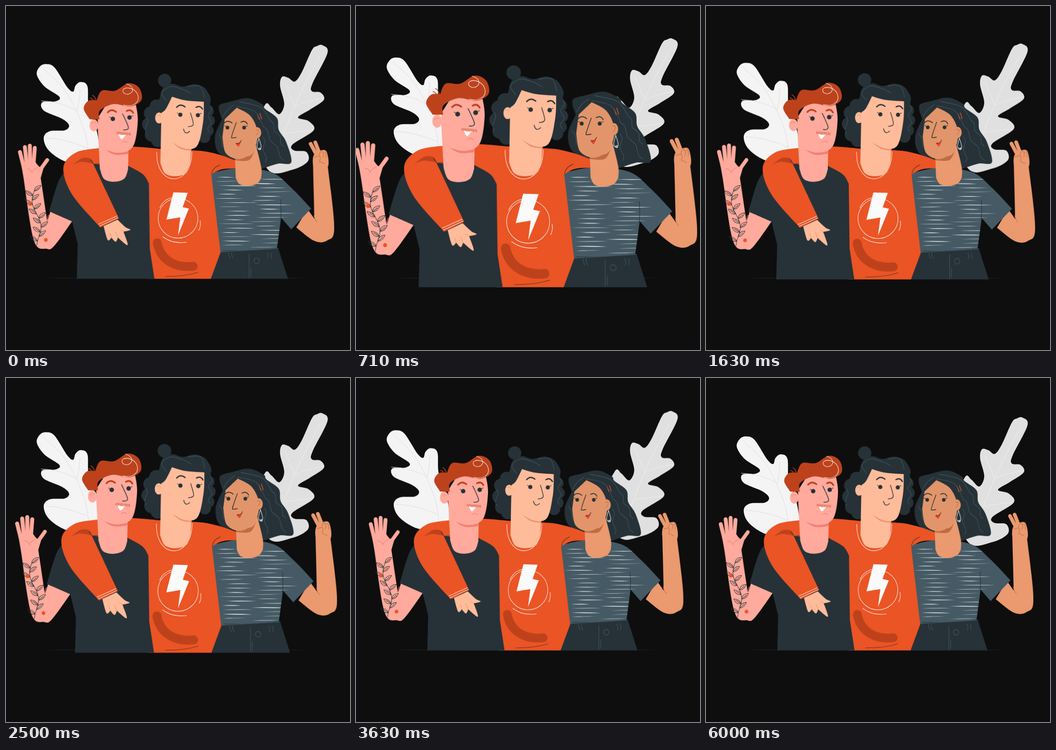
Recreate the animation shown at these times as an HTML page. Size 748 by 748 pixels, loop 6.04 s.

```html
<!DOCTYPE html>
<html lang="en">
<head>
<meta charset="utf-8">
<title>Three friends</title>
<style>
html, body { margin: 0; width: 100%; height: 100%; overflow: hidden; background: #0e0e0e; }
svg { display: block; width: 100%; height: 100%; }
path { stroke-linecap: round; stroke-linejoin: round; }
#leaves { animation: float 6040ms linear infinite; }
#people { transform-origin: 370px 370.5px; animation: beat 6040ms linear infinite; }
@keyframes float {
  0% { transform: translateY(-.8px); }
  24.21%, 49.04%, 73.87%, 98.71%, 100% { transform: translateY(0); }
  11.79%, 36.62%, 61.46%, 86.29% { transform: translateY(-15px); }
}
@keyframes beat {
  0% { transform: scale(1.005); }
  9.3%, 49.04% { transform: scale(1.1); }
  29.17%, 39.11%, 58.97%, 100% { transform: scale(1); }
}
</style>
</head>
<body>
<svg id="stage" viewBox="0 0 748 748"></svg>
<script>
const DARK = '#263238', SLATE = '#455a64', ORANGE = '#eb5424', RUST = '#bd421c', WHITE = '#fafafa';
const ROSE = '#ffaa9c', BLUSH = '#f17f73', PEACH = '#ffbc9b', AMBER = '#ef936c';
const TAN = '#eb996e', BROWN = '#e2956a', UMBER = '#c06c42';

const times = (n, make) => Array.from({ length: n }, (_, i) => make(i)).join('');
const random = (seed => () => (seed = seed * 16807 % 2147483647) / 2147483647)(71);

// Smooth curve through key points; "/" makes the point before it a corner.
function curve(pts, loop) {
  const n = pts.length;
  const at = i => loop ? pts[(i + n) % n] : pts[Math.max(0, Math.min(n - 1, i))];
  let d = '';
  for (let i = 0; i < (loop ? n : n - 1); i++) {
    const [a, b, c, e] = [at(i - 1), at(i), at(i + 1), at(i + 2)];
    const p = b.map((v, k) => v + (c[k] - a[k]) / 6);
    const q = c.map((v, k) => v - (e[k] - b[k]) / 6);
    d += `C${p} ${q} ${c}`;
  }
  return d;
}
function trace(text, closed) {
  if (text[0] === 'M') return text;
  const parts = text.split('/').map(s => s.trim().split(/\s+/).map(p => p.split(',').map(Number)));
  const start = 'M' + parts[0][0];
  if (parts.length === 1) return start + curve(parts[0], closed);
  return start + parts.map((part, i) => curve(i ? [parts[i - 1].at(-1), ...part] : part)).join('') + (closed ? 'Z' : '');
}
const fill = (text, color) => `<path d="${trace(text, true)}" fill="${color}"/>`;
const line = (text, color = DARK, w = 1) =>
  `<path d="${trace(text)}" fill="none" stroke="${color}" stroke-width="${w}"/>`;
const oval = (x, y, rx, ry, color) => `<ellipse cx="${x}" cy="${y}" rx="${rx}" ry="${ry}" fill="${color}"/>`;
const ring = (x, y, r, color) => `<circle cx="${x}" cy="${y}" r="${r}" fill="none" stroke="${color}"/>`;

// Sine strand between two points.
function wave(x, y, u, v, amp, turns) {
  const len = Math.hypot(u - x, v - y), pts = [];
  for (let i = 0; i <= turns * 4; i++) {
    const t = i / turns / 4, s = amp * Math.sin(i * Math.PI / 2);
    pts.push(`${x + (u - x) * t + (v - y) / len * s},${y + (v - y) * t - (u - x) / len * s}`);
  }
  return line(pts.join(' '), SLATE);
}
// Round locks along an arc, with the middle filled.
const curls = (x, y, rx, ry, r, from, to) => oval(x, y, rx, ry, DARK) + times(5, i => {
  const a = (from + (to - from) * i / 4) * Math.PI / 180;
  return oval(x + rx * Math.cos(a), y + ry * Math.sin(a), r, r, DARK);
});
const eyes = (x, y, u, v, r) => oval(x, y, r, r, DARK) + oval(u, v, r, r, DARK) +
  line(`M${x - r},${y - 3} l-2,-1 M${u + r},${v - 3} l3,-1`, DARK, 1.2);
const brows = (x, y, u, v, color, w) =>
  line(`M${x - 9},${y + 4} q8,-9 18,-1 M${u - 7},${v + 2} q9,-5 14,4`, color, w);

const leftLeaf = () =>
  fill('88,127 106,135 133,177 146,187 151,174 162,166 177,175 180,222 199,280 202,350 135,341 94,316 82,288 95,273 128,271 137,260 122,246 82,228 79,210 108,208 116,198 84,176 67,150 74,132', '#f4f4f4') +
  line('80,136 130,187 168,265 180,320', '#dedede') +
  line('M77,207 Q120,208 155,229 Q160,205 161,182 M86,288 Q125,288 176,309', '#dedede');

const rightLeaf = () =>
  fill('688,86 699,103 667,168 665,186 684,189 691,205 661,226 635,243 658,251 669,271 623,302 627,315 653,318 656,339 622,357 572,359 540,280 563,216 577,221 594,236 605,214 596,175 600,155 614,157 628,165 643,145 665,97 676,88', '#e0e0e0') +
  line('683,109 637,197 601,285 578,345', '#f0f0f0') +
  line('M607,169 L628,219 Q650,208 690,201 M667,270 L606,278', '#f0f0f0');

function stripes() {
  return times(34, i => {
    const w = 38 + 45 * random(), x = 448 + (i % 2) * 78 + 28 * random();
    const y = 372 + i * 4.6, sag = 2 * random() - 1;
    return `<path d="M${x},${y} q${w / 2},${sag + 1.1} ${w},${sag} q${-w / 2},${-sag - 1} ${-w},${-sag}" fill="${WHITE}"/>`;
  });
}

const girlArm = () =>
  fill('630,481 669,510 697,509 712,480 697,340 / 666,338 / 669,462 / 654,441', TAN) +
  line('M661,300 L677,330 M671,297 L683,328', TAN, 8) +
  fill('667,326 684,314 696,318 698,350 670,354', TAN) +
  line('M680,327 q-1,-9 5,-11 q6,4 2,13 M690,319 q6,-6 4,11 M669,329 q18,-8 11,9 l11,5 M668,455 q2,9 7,14', UMBER);

const girlBody = () => {
  const shirt = '440,365 500,353 575,361 619,395 662,440 / 619,485 / 597,460 / 588,528 / 460,535';
  return fill(shirt, SLATE) +
    `<clipPath id="shirt"><path d="${trace(shirt, true)}"/></clipPath><g clip-path="url(#shirt)">${stripes()}</g>` +
    line('M596,421 Q598,440 596,462 M470,531 Q530,533 588,526') +
    fill('M460,534 L591,526 L612,592 L440,592Z', DARK) +
    line('M467,534 L591,526.5 M528,538 V591 M532,569 V588', SLATE) + ring(544, 553, 6, SLATE) +
    times(4, i => line(`M${[484, 490, 567, 574][i]},535 q${i < 2 ? -1 : 4},7 ${i < 2 ? 4 : 1},13`, SLATE));
};

const girlHead = () =>
  fill('463,230 464,216 486,209 525,201 556,214 562,224 588,244 592,270 608,296 619,340 590,343 556,354 / 480,329 459,315 454,283 469,247', DARK) +
  fill('497,325 / 499,374 / 507,387 526,391 545,386 554,374 / 554,350 541,297', TAN) +
  fill('497,331 530,325 541,310 / 528,335 498,336', UMBER) +
  oval(545, 276, 9, 12, BROWN) +
  fill('475,247 501,222 / 531,240 546,275 538,313 508,333 478,321 470,285', BROWN) +
  line('M542,270 q12,-2 2,11', UMBER) +
  line('549,288 545,306 550,312 554,306 549,288', WHITE) + ring(551, 311, 2, WHITE) +
  eyes(481, 265, 517, 265, 4) + brows(482, 252, 517, 251, DARK, 1.8) +
  line('500,254 490,284 493,287 500,286', DARK, 1.4) +
  fill('499,298 506,298 511,293 505,306', '#ee4326') + line('M499,300 Q507,301 511,292') +
  line('M546,236 l4,11 M551,234 l4,12', ORANGE, 1.4) +
  line('501,219 540,230 559,263', SLATE) + line('507,209 553,221 574,250', SLATE) +
  times(2, i => wave(559 + i * 15, 263 - i * 13, 603, 336 - i * 30, 3, 2)) +
  wave(558, 285, 563, 340, 3, 1.5) + wave(495, 216, 471, 242, -3, .5) + wave(462, 278, 470, 308, 3, .5);

const midBody = () =>
  curls(335, 255, 24, 38, 15, 252, 100) + curls(425, 250, 16, 38, 13, -68, 68) +
  fill('336,225 335,198 343,177 362,170 384,176 412,171 436,184 437,215', DARK) +
  oval(345, 163, 14.5, 14.5, DARK) +
  fill('200,310 270,306 337,311 / 403,314 441,318 497,333 / 510,353 / 470,355 446,366 / 466,535 / 445,592 / 310,592 / 200,350', ORANGE) +
  line('M447,364 Q449,352 464,346') +
  line('M328,318 C326,395 404,395 404,317', WHITE) +
  ring(374, 461, 43, WHITE) +
  line('M335,438 Q344,418 365,416 M422,466 Q424,477 419,487 M341,501 Q362,517 392,513', WHITE) +
  fill('M364,405 L395,406 L384,437 L397.5,440 L374,498 L379,459 L349,464Z', WHITE) +
  line('M329,514 C336,552 368,569 407,565', RUST, 19) +
  line('M347,587 Q390,587 417,578', DARK, .8);

const midHead = () =>
  oval(333, 244, 8.5, 12, PEACH) +
  fill('338,235 / 336,342 / 346,364 368,370 392,363 401,337 / 403,300', PEACH) +
  fill('362,297 383,308 403,308 / 403,315 / 380,311 362,297', AMBER) +
  fill('338,233 348,224 361,198 / 390,206 430,209 / 428,255 414,306 379,307 345,278', PEACH) +
  line('M329,239 q8,-4 7,3', AMBER) + line('M333,256 q-4,5 3,8') +
  eyes(379, 237, 417, 238, 4.5) + brows(380, 217, 420, 219, DARK, 2.6) +
  line('401,233 407,258 396,263', DARK, 1.4) + line('M386,268 Q389,282 399,273', DARK, 1.5) +
  line('349,207 339,190 358,176 384,182 402,191', SLATE) + line('395,176 422,176 431,200', SLATE) +
  wave(443, 218, 442, 275, 4, 2) + wave(306, 242, 306, 278, 3, 1);

// Vine that follows a sine stem, with a leaf on alternate sides.
function tattoo() {
  const stem = u => [63 + 12 * u - 7 * Math.sin(7.5 * u), 402 + 118 * u];
  const points = Array.from({ length: 13 }, (_, i) => stem(i / 12));
  return line(points.map(p => p.join()).join(' ')) + times(12, i =>
    `<path d="M0,0 Q8,-8 19,0 Q8,6 0,0 H13" transform="translate(${points[i]}) rotate(${i % 2 ? -147 : -40})" fill="none" stroke="${DARK}"/>`);
}

const manBody = () =>
  times(4, i => line(`M${32 + i * 10.7},${304 + 3.8 * (i - 1.9) ** 2} L${41 + i * 6.5},354`, ROSE, 8.5)) +
  line('M91,335 L73,360', ROSE, 8) +
  fill('34,340 / 66,340 / 75,350 85,346 / 77,374 / 91,468 / 99,443 / 146,466 / 107,520 90,527 62,509 40,375', ROSE) +
  line('M47,354 Q55,354 59,364 M58,361 Q64,354 71,351 M91,468 Q91,459 94,454', BLUSH) +
  tattoo() + oval(54, 430, 4, 4, ORANGE) + oval(88, 508, 4, 4, ORANGE) +
  fill('132,358 115,382 95,446 / 145,468 / 157,517 / 155,592 / 323,592 / 313,527 / 311,386 / 298,366 265,347 / 190,342', DARK);

const sleeve = () =>
  fill('213,478 222,508 230,503 / 239,512 244,503 / 265,519 256,490 / 271,486 260,480 243,464', PEACH) +
  line('M230,503 l-3,-10 M244,503 l-5,-12 M256,490 q-4,-4 -7,-3', AMBER) +
  fill('205,309 153,319 126,352 145,410 206,481 / 246,461 / 191,344 / 207,345', ORANGE) +
  fill('147,345 167,331 185,332 191,343 / 165,339 147,345', RUST) +
  line('M185,335 L192,344 L203,343') + line('M202,474 l40,-18 M204,478 l40,-18', WHITE);

const manHead = () =>
  oval(192, 260, 9.5, 13, ROSE) +
  fill('200,260 / 205,354 / 214,376 236,382 258,375 266,355 / 267,310', ROSE) +
  fill('207,305 237,319 267,316 / 266,322 / 235,323 207,305', BLUSH) +
  fill('200,245 220,213 / 282,211 / 287,250 278,303 252,319 216,312 203,294', ROSE) +
  line('M187,257 q3,-6 9,-2', BLUSH) +
  fill('183,247 170,224 180,207 198,206 / 209,185 238,185 267,169 290,179 295,205 271,219 235,214 205,228 204,247 / 194,247', RUST) +
  line('M197,208 q-2,-10 -8,-13 M192,208 q-3,-6 -8,-7', RUST, 1.6) +
  line('M262,170 C276,174 279,184 272,190 C264,196 254,191 255,184 C257,177 270,178 278,183 C291,192 291,208 280,214 Q270,220 256,216', WHITE) +
  brows(231, 228, 270, 227, RUST, 3.5) + eyes(233, 246, 269, 243, 4.8) +
  line('254,235 266,262 264,269 256,270', DARK, 1.5) +
  times(10, i => line(`M${243 + i * 3},${274 + i * .3} l${i * .3 - 1.8},${4 + i % 2}`, RUST)) +
  fill('245,279 / 253,281 261,280 / 252,290 245,279', '#fff') + line('M253,297 Q259,291 265,298', BLUSH);

const people = [girlArm, girlBody, midBody, midHead, girlHead, manBody, sleeve, manHead];
document.getElementById('stage').innerHTML =
  oval(370, 591.5, 285, .45, DARK) +
  `<g id="leaves">${leftLeaf()}${rightLeaf()}</g>` +
  `<g id="people">${people.map(draw => draw()).join('')}</g>`;
</script>
</body>
</html>
```
